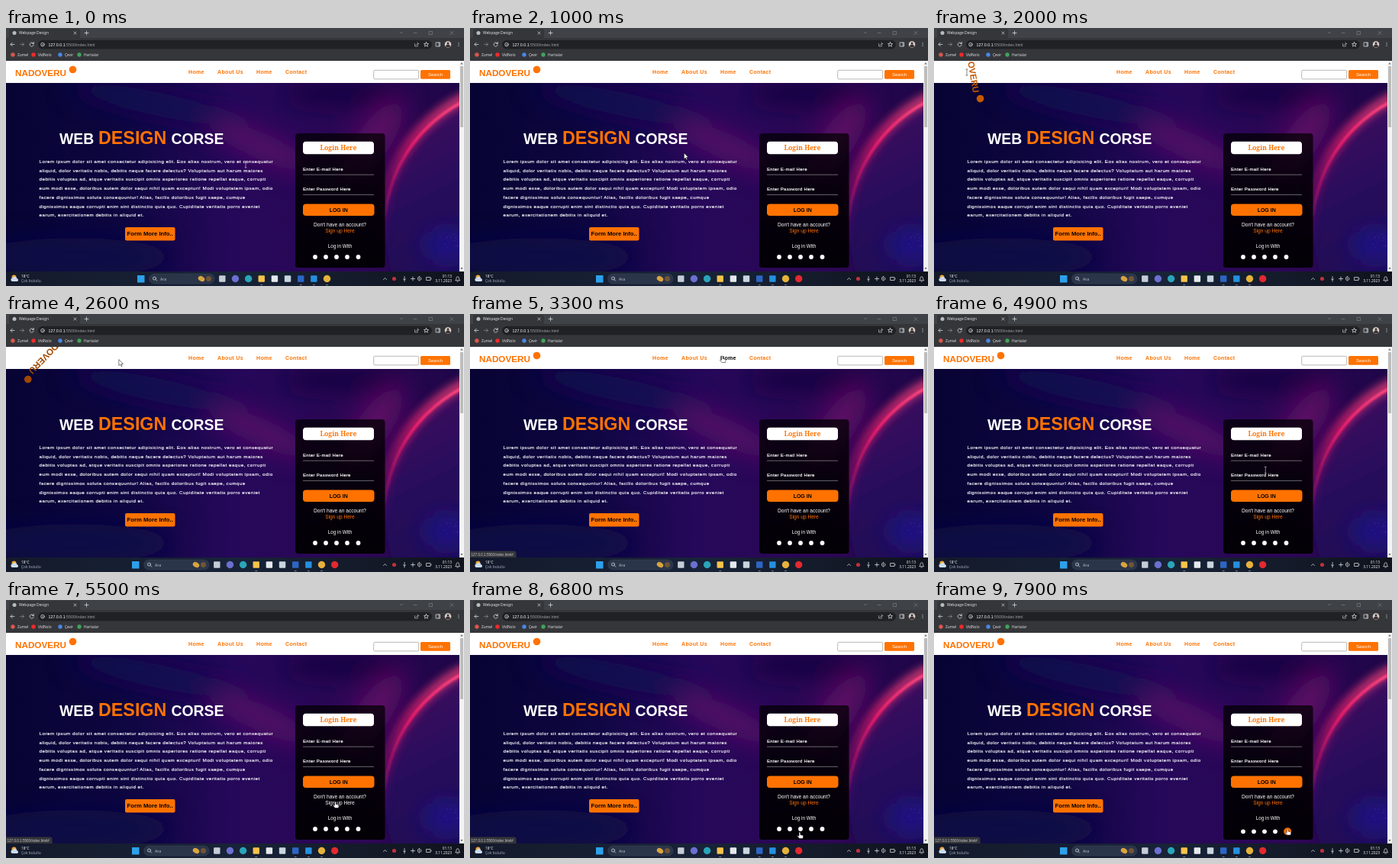
Write an HTML page that moves like this. It is 600x338 px and loops after 8 s.

```html
<!DOCTYPE html>
<html lang="en">
<head>
<meta charset="utf-8">
<title>Webpage Design</title>
<style>
html, body { margin: 0; width: 100%; height: 100%; overflow: hidden; background: #202124; }
svg { display: block; width: 100vw; height: 100vh; }
text { font-family: "Liberation Sans", Arial, sans-serif; white-space: pre; }
.ui text { font-family: "Open Sans", "Noto Sans", sans-serif; }
.ui .url { font-family: "Liberation Sans", Arial, sans-serif; }
.mid { text-anchor: middle; }
.end { text-anchor: end; }
.bold { font-weight: 700; }
.crisp { stroke: #fff; stroke-width: .16; }
.line { fill: none; stroke: #d5d7da; stroke-width: .8; stroke-linecap: round; stroke-linejoin: round; }
</style>
</head>
<body>
<svg id="stage" viewBox="0 0 600 338">
  <defs>
    <linearGradient id="sky">
      <stop offset="0" stop-color="#070433"/><stop offset=".25" stop-color="#0d0640"/>
      <stop offset=".5" stop-color="#26085a"/><stop offset=".8" stop-color="#2c0754"/>
      <stop offset="1" stop-color="#1d0648"/>
    </linearGradient>
    <linearGradient id="rim" gradientUnits="userSpaceOnUse" x1="590" y1="90" x2="500" y2="290">
      <stop offset="0" stop-color="#ff4a80"/><stop offset=".35" stop-color="#e81f6c"/>
      <stop offset=".7" stop-color="#a0126c" stop-opacity=".7"/><stop offset="1" stop-color="#4a1080" stop-opacity="0"/>
    </linearGradient>
    <linearGradient id="inside" x2=".5" y2="1">
      <stop offset="0" stop-color="#480b60"/><stop offset=".35" stop-color="#290a5c"/><stop offset="1" stop-color="#100648"/>
    </linearGradient>
    <linearGradient id="card" x2="0" y2="1">
      <stop offset="0" stop-color="#000" stop-opacity=".72"/><stop offset=".5" stop-color="#000" stop-opacity=".86"/>
      <stop offset="1" stop-color="#000" stop-opacity=".93"/>
    </linearGradient>
    <linearGradient id="bar">
      <stop offset="0" stop-color="#141a2b"/><stop offset=".5" stop-color="#182338"/><stop offset="1" stop-color="#10131d"/>
    </linearGradient>
    <filter id="soft" x="-100%" y="-150%" width="300%" height="400%"><feGaussianBlur stdDeviation="16"/></filter>
    <filter id="glow" x="-20%" y="-20%" width="140%" height="140%"><feGaussianBlur stdDeviation="6"/></filter>
    <filter id="edge" x="-5%" y="-5%" width="110%" height="110%"><feGaussianBlur stdDeviation="1"/></filter>
    <clipPath id="hero"><rect y="72" width="594" height="247"/></clipPath>
    <clipPath id="view"><rect y="43" width="594" height="276"/></clipPath>
  </defs>

  <g clip-path="url(#hero)">
    <rect y="72" width="594" height="247" fill="url(#sky)"/>
    <g filter="url(#soft)">
      <ellipse cx="200" cy="100" rx="120" ry="16" fill="#150a55" transform="rotate(12 200 100)"/>
      <ellipse cx="335" cy="155" rx="75" ry="17" fill="#6a0f6c" transform="rotate(24 335 155)" opacity=".75"/>
      <ellipse cx="480" cy="150" rx="65" ry="22" fill="#700f6c" transform="rotate(-55 480 150)" opacity=".8"/>
      <ellipse cx="440" cy="86" rx="80" ry="16" fill="#150540"/>
      <ellipse cx="90" cy="300" rx="130" ry="25" fill="#0e0746"/>
    </g>
    <circle cx="685" cy="265" r="188" fill="url(#inside)" filter="url(#edge)"/>
    <ellipse cx="578" cy="285" rx="30" ry="20" fill="#1a1290" filter="url(#soft)"/>
    <g fill="none" stroke="url(#rim)">
      <circle cx="685" cy="265" r="193" stroke-width="13" filter="url(#glow)" opacity=".8"/>
      <circle cx="685" cy="265" r="189.500" stroke-width="4" filter="url(#edge)"/>
    </g>
    <g id="specks" fill="#3c35c8"></g>
  </g>

  <rect y="43" width="594" height="29" fill="#fff"/>
  <g clip-path="url(#view)">
    <g id="logo">
      <text class="bold" x="12" y="62.500" font-size="11.700">NADOVERU</text>
      <circle cx="87.500" cy="54.500" r="4.800"/>
    </g>
  </g>
  <g id="nav" class="bold" font-size="7" letter-spacing=".35"></g>
  <rect x="481.700" y="55.300" width="59" height="11.600" rx="1.500" fill="#fff" stroke="#888" stroke-width=".6"/>
  <rect x="543" y="55" width="39" height="11.800" rx="1.500" fill="#ff7200"/>
  <text class="mid" x="562.500" y="63" font-size="6" fill="#fff">Search</text>

  <g class="bold" fill="#fff" font-size="19.400">
    <text x="70" y="152">WEB</text>
    <text x="121" y="152" font-size="23.300" fill="#ff7200">DESIGN</text>
    <text x="216.500" y="152">CORSE</text>
  </g>
  <g id="copy" class="crisp" fill="#fff" font-size="6.250" letter-spacing=".47"></g>
  <rect x="156" y="261" width="65.500" height="17.500" rx="2" fill="#ff7200"/>
  <text class="bold mid" x="188.700" y="272.400" font-size="7.700">Form More Info..</text>

  <rect x="379" y="138" width="117.500" height="176" rx="4" fill="url(#card)"/>
  <rect id="titleBox" x="389" y="148.700" width="93" height="16.600" rx="4"/>
  <text id="title" class="bold mid" x="435.500" y="160.200" font-size="8.600" style="font-family:'Noto Serif',serif">Login Here</text>
  <g class="crisp" fill="#fff" font-size="6" letter-spacing=".3">
    <text x="389" y="187">Enter E-mail Here</text>
    <text x="389" y="213.300">Enter Password Here</text>
  </g>
  <path d="M389 192.200h93M389 218.400h93" stroke="#aaa" stroke-width=".6"/>
  <rect id="loginBox" x="389" y="230.500" width="93.500" height="15.500" rx="4"/>
  <text id="login" class="bold mid" x="435.700" y="240.700" font-size="7">LOG IN</text>
  <g class="mid" fill="#fff" font-size="6.600">
    <text x="437.500" y="260">Don't have an account?</text>
    <text id="signup" x="437.500" y="268">Sign up Here</text>
    <text x="437.500" y="288" font-size="6.300">Log in With</text>
  </g>
  <g id="social"></g>

  <rect x="594" y="43" width="6" height="276" fill="#f4f4f4"/>
  <rect x="595" y="50" width="4" height="80" fill="#bdbdbd"/>
  <path d="M595.300 47.500l1.700-2.200 1.700 2.200zM595.300 314l1.700 2.200 1.700-2.200z" fill="#666"/>

  <g class="ui">
    <rect width="600" height="14" fill="#3f4246"/>
    <path d="M2 14q2 0 2-3V4q0-3 3-3h87q3 0 3 3v7q0 3 2 3z" fill="#35363a"/>
    <rect y="13" width="600" height="30" fill="#35363a"/>
    <circle cx="11" cy="6.500" r="2.500" fill="#b9bcc1"/>
    <text x="17" y="8.400" font-size="5" fill="#e8eaed">Webpage Design</text>
    <rect x="42" y="16" width="516" height="11.500" rx="5.700" fill="#202124"/>
    <g class="line">
      <path d="M89 5l3 3m0-3l-3 3M105.500 4v5m-2.500-2.500h5"/>
      <path d="M516 5l2 2 2-2M534 6.500h4M554.500 4.500h4v4h-4zM582 4.500l4 4m0-4l-4 4" opacity=".35"/>
      <path d="M11 21.500H6m2.300-2.300L6 21.500l2.300 2.300"/>
      <path d="M18.500 21.500h5m-2.300-2.300l2.300 2.300-2.300 2.300" opacity=".45"/>
      <path d="M36 20.200a2.600 2.600 0 1 0 .3 2M36.300 18.500v2h-2"/>
      <path d="M535.500 20.500v3.500h4v-1M537 22.500q.5-2 3.500-2m-1.500-1.500l1.600 1.500-1.600 1.500" opacity=".7"/>
      <path d="M550.500 18.600l.9 1.900 2.100.2-1.600 1.400.5 2.100-1.900-1.100-1.900 1.100.5-2.100-1.600-1.400 2.100-.2z"/>
      <path d="M563.500 19h5v5h-5zM567 19v5"/>
      <circle cx="48" cy="21.700" r="2.300"/><path d="M48 21.500v1.200"/>
    </g>
    <text class="url" x="55.500" y="23.700" font-size="5.300" fill="#9aa0a6"><tspan fill="#fff">127.0.0.1</tspan>:5500/index.html</text>
    <circle cx="579" cy="21.500" r="4.300" fill="#d8d0ca"/>
    <path d="M576 24.500q0-3 3-3t3 3q-3 2-6 0z" fill="#3c3132"/><circle cx="579" cy="20" r="1.500" fill="#3c3132"/>
    <g fill="#e0e0e0"><circle cx="593" cy="19.500" r=".6"/><circle cx="593" cy="21.500" r=".6"/><circle cx="593" cy="23.500" r=".6"/></g>
    <g id="bookmarks" font-size="4.800" fill="#e8eaed"></g>

    <g id="status">
      <path d="M0 310.500h58q2.500 0 2.500 2.500v6H0z" fill="#35363a"/>
      <text class="url" x="1.500" y="317" font-size="4.600" fill="#c6c9ce">127.0.0.1:5500/index.html#</text>
    </g>

    <rect y="319" width="600" height="19" fill="url(#bar)"/>
    <circle cx="10.500" cy="326.500" r="3" fill="#f2a53a"/>
    <path d="M8 332a2.300 2.300 0 0 1 .5-4.500 3.200 3.200 0 0 1 6 .7 2 2 0 0 1 .3 3.800z" fill="#c9dcf0"/>
    <g font-size="4.800" fill="#fff">
      <text x="20" y="326.600">18°C</text><text x="20" y="333.200" fill="#aeb4c0">Çok bulutlu</text>
      <text class="end" x="584" y="326.600">01:13</text><text class="end" x="584" y="333.200">3.11.2023</text>
    </g>
    <g id="tasks">
      <rect x="172" y="324" width="9.500" height="9.500" fill="#2da0ea"/>
      <rect x="187.500" y="322" width="85.500" height="13" rx="6.500" fill="#2b3549" stroke="#3c465a" stroke-width=".5"/>
      <g class="line"><circle cx="194.500" cy="328" r="2"/><path d="M196 329.500l1.700 1.700"/></g>
      <text x="202" y="330.500" font-size="5.200" fill="#c3c8d2">Ara</text>
      <ellipse cx="256" cy="328.500" rx="4.500" ry="3.300" fill="#d8a441" transform="rotate(30 256 328.500)"/>
      <circle cx="265.500" cy="328.500" r="3.500" fill="#705536"/>
    </g>
    <g class="line">
      <path d="M494.500 329.500l2-2 2 2M541.500 331l-2-1.500v-2.500l2-1.500zM543.500 327q1.500 1.500 0 3M530.500 328.500h5m-2.500-2.500v5M551 326.500h5v4h-5zM557 328v1"/>
      <path d="M589 330.500q1-.8 1-3a1.700 1.700 0 0 1 3.400 0q0 2.200 1 3zM591 332h1.200"/>
      <path d="M522 325.500v4M520.500 329q1.500 2 3 0M522 330v2"/>
    </g>
    <circle cx="508.500" cy="328.500" r="2.600" fill="#b9333b"/>
  </g>

  <path id="beam" d="M-1.500-4h3M0-4v8M-1.500 4h3" fill="none" stroke-width=".6"/>
  <path id="arrow" d="M0 0v8l1.900-1.700 1.300 2.800 1.200-.6-1.200-2.700h2.500z" fill="#fff" stroke="#000" stroke-width=".5"/>
  <path id="hand" d="M-1 .5a.9.900 0 0 1 1.800 0v2.600l3 .7q1 .3.800 1.500l-.6 2.700H-.5l-2.600-3.300q.3-1.200 2.100.1z" fill="#fff" stroke="#000" stroke-width=".5"/>
</svg>
<script>
const $ = id => document.getElementById(id);
const LOOP = 8000, ORANGE = "#ff7200";

function add(parent, tag, attrs, text) {
  const el = document.createElementNS("http://www.w3.org/2000/svg", tag);
  for (const key in attrs) el.setAttribute(key, attrs[key]);
  if (text) el.textContent = text;
  return $(parent).appendChild(el);
}

const links = [["Home", 239, 21], ["About Us", 277, 33], ["Home", 328, 21], ["Contact", 366, 28]]
  .map(([label, x, w]) => ({ box: [x, 52, w, 12], el: add("nav", "text", { x, y: 60 }, label) }));

[
  "Lorem ipsum dolor sit amet consectetur adipisicing elit. Eos alias nostrum, vero et consequatur",
  "aliquid, dolor veritatis nobis, debitis neque facere delectus? Voluptatum aut harum maiores",
  "debitis voluptas ad, atque veritatis suscipit omnis asperiores ratione repellat eaque, corrupti",
  "eum modi esse, doloribus autem dolor sequi nihil quam excepturi! Modi voluptatem ipsam, odio",
  "facere dignissimos soluta consequuntur! Alias, facilis doloribus fugit saepe, cumque",
  "dignissimos eaque corrupti enim sint distinctio quia quo. Cupiditate veritatis porro eveniet",
  "earum, exercitationem debitis in aliquid et."
].forEach((line, i) => add("copy", "text", { x: 43.5, y: 177 + i * 11.72 }, line));

const socials = [405, 419, 433, 447, 461.5].map(x => ({ x, el: add("social", "circle", { cx: x, cy: 300 }) }));

[["Zumel", 15, "#d9574b"], ["VidNolo", 42, "#ee2b2b"], ["Çevir", 77, "#4a86e8"], ["Haritalar", 102, "#3fa45b"]]
  .forEach(([label, x, fill]) => {
    add("bookmarks", "circle", { cx: x - 6, cy: 35, r: 2.7, fill });
    add("bookmarks", "text", { x, y: 36.8 }, label);
  });

const appX = i => 283.3 + i * 17.15;
const apps = ["#c5ccd6", "#6b6fd0", "#2aa5b8", "#f5c24b", "#e4e8ee", "#c8d5df", "#2c65c4", "#2590e0", "#e5b23b", "#e2292f"]
  .map((fill, i) => i === 1 || i === 2 || i > 7
    ? add("tasks", "circle", { cx: appX(i), cy: 328.5, r: 4.7, fill })
    : add("tasks", "rect", { x: appX(i) - 4.2, y: 324.3, width: 8.4, height: 8.4, rx: 1, fill }));
for (const i of [3, 6, 7, 8]) add("tasks", "rect", { x: appX(i) - 1.5, y: 336, width: 3, height: .8, rx: .4, fill: "#8fa3bb" });

let seed = 7;
const random = () => (seed = seed * 16807 % 2147483647) / 2147483647;
for (let i = 0; i < 45; i++) {
  const x = 574 + random() * 20, y = 268 + random() * 20;
  add("specks", "circle", { cx: x, cy: y, r: .3 + random() * .5, opacity: .2 + random() * .5 });
}

// time, x, y
const path = [
  [0, 314, 179], [800, 314, 179], [1700, 50, 59], [2000, 43, 58], [2350, 70, 60], [2900, 249, 59],
  [3100, 293, 58], [3300, 330.5, 55.5], [3700, 380, 58], [4100, 432, 153], [4300, 436, 157],
  [4700, 432, 185], [5000, 435, 211], [5250, 434, 239], [5500, 431.5, 264.5], [5850, 425, 267],
  [6200, 405, 300], [6500, 419, 301], [6800, 432, 304.5], [7250, 447, 301], [7650, 462, 300], [8000, 463.5, 300]
];
const ease = p => p * p * (3 - 2 * p);
const ramp = (t, from, to) => ease(Math.min(1, Math.max(0, (t - from) / (to - from))));

function pointer(t) {
  const i = path.findIndex(p => p[0] > t), [t0, x0, y0] = path[i - 1], [t1, x1, y1] = path[i];
  const k = ramp(t, t0, t1);
  return [x0 + (x1 - x0) * k, y0 + (y1 - y0) * k];
}

function draw(t) {
  const [px, py] = pointer(t);
  const over = ([x, y, w, h]) => px >= x && px <= x + w && py >= y && py <= y + h;
  const fill = (id, color) => $(id).setAttribute("fill", color);
  let linked = false;

  for (const { box, el } of links) {
    const hot = over(box);
    el.setAttribute("fill", hot ? "#000" : ORANGE);
    linked ||= hot;
  }

  // A hovered icon grows and pushes the whole row down.
  const distance = ({ x }) => Math.hypot(px - x, py - 300);
  const hotIcon = socials.find(icon => distance(icon) < 4);
  for (const icon of socials) {
    const hot = icon === hotIcon;
    icon.el.setAttribute("fill", hot ? ORANGE : "#fff");
    icon.el.setAttribute("r", hot ? 5 : 2.9);
    icon.el.setAttribute("cx", icon.x + (hot ? 1.7 : 0));
    linked ||= distance(icon) < 7;
  }
  $("social").setAttribute("transform", `translate(0 ${hotIcon ? 3.3 : 0})`);

  const signup = over([418, 261, 39, 8]);
  fill("signup", signup ? "#fff" : ORANGE);
  linked ||= signup;

  const title = over([389, 149, 93, 16]), login = over([389, 230, 94, 16]);
  fill("titleBox", title ? ORANGE : "#fff");
  fill("title", title ? "#fff" : ORANGE);
  fill("loginBox", login ? "#fff" : ORANGE);
  fill("login", login ? ORANGE : "#000");

  // The logo spins and darkens together while hovered.
  const spin = .67 * ramp(t, 1775, 2360) * (1 - ramp(t, 2360, 2880));
  $("logo").setAttribute("transform", `rotate(${360 * spin} 51.5 57.5)`);
  fill("logo", `rgb(${255 * (1 - spin)}, ${114 * (1 - spin)}, 0)`);

  const recording = t >= 200;
  $("tasks").setAttribute("transform", `translate(${recording ? -7 : 0})`);
  apps[9].style.display = recording ? "" : "none";
  $("status").style.display = linked ? "" : "none";

  const typing = title || over([12, 48, 82, 20]) || over([43, 170, 308, 80]) || over([389, 176, 93, 43]);
  const kind = linked || login ? "hand" : typing ? "beam" : "arrow";
  for (const id of ["hand", "beam", "arrow"]) $(id).style.display = id === kind ? "" : "none";
  $(kind).setAttribute("transform", `translate(${px} ${py})`);
  $("beam").setAttribute("stroke", py < 72 ? "#333" : "#dcdcdc");
}

const start = performance.now();
function tick() {
  draw((performance.now() - start) % LOOP);
  requestAnimationFrame(tick);
}
tick();
</script>
</body>
</html>
```
